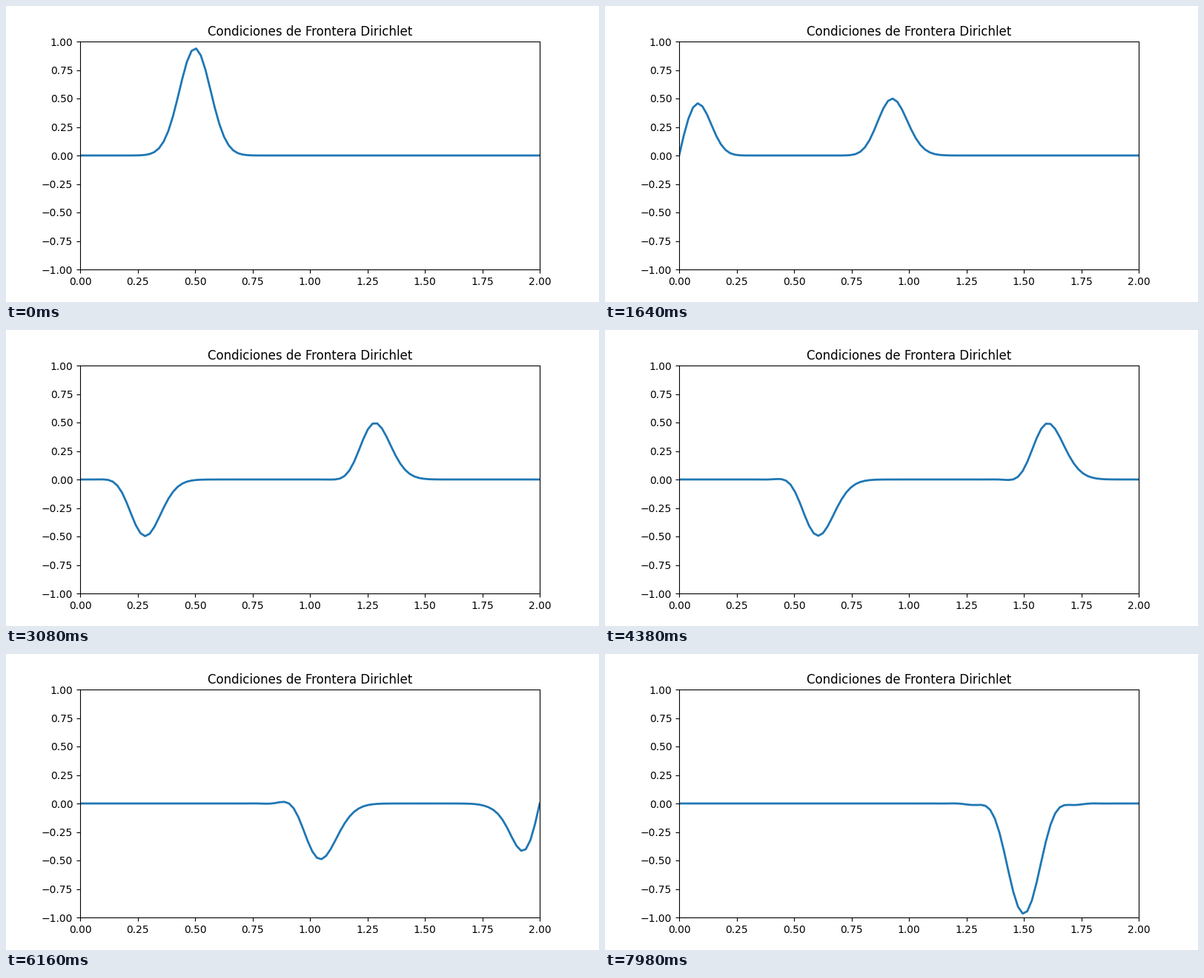
These frames come from a looping animation (800x400 px, 8000 ms). A matplotlib script:

```python
import numpy as np
import matplotlib.pyplot as plt
from matplotlib.animation import FuncAnimation

LENGTH, POINTS = 2.0, 100
SPEED, DT = 1.0, 0.005
FRAMES, INTERVAL = 400, 20
WARMUP = 4  # steps taken before the first picture

x = np.linspace(0, LENGTH, POINTS)
r2 = (SPEED * DT / (x[1] - x[0])) ** 2


def solve(steps):
    """Leapfrog solution of the wave equation with fixed ends."""
    u = np.exp(-((x - 0.5) / 0.09) ** 2)
    prev = u.copy()
    history = [u]
    for _ in range(steps):
        new = np.zeros_like(u)
        new[1:-1] = (2 * u[1:-1] - prev[1:-1]
                     + r2 * (u[2:] - 2 * u[1:-1] + u[:-2]))
        prev, u = u, new
        history.append(u)
    return history


waves = solve(FRAMES + WARMUP)[WARMUP:]

plt.rcParams["font.family"] = "DejaVu Sans"
fig, ax = plt.subplots(figsize=(8, 4), dpi=100)
ax.set_xlim(0, LENGTH)
ax.set_ylim(-1, 1)
ax.set_title("Condiciones de Frontera Dirichlet")
line, = ax.plot(x, waves[0], lw=2)


def update(frame):
    line.set_ydata(waves[frame])
    return line,


anim = FuncAnimation(fig, update, frames=FRAMES, interval=INTERVAL,
                     blit=True, repeat=True, repeat_delay=0)
plt.show()
```
